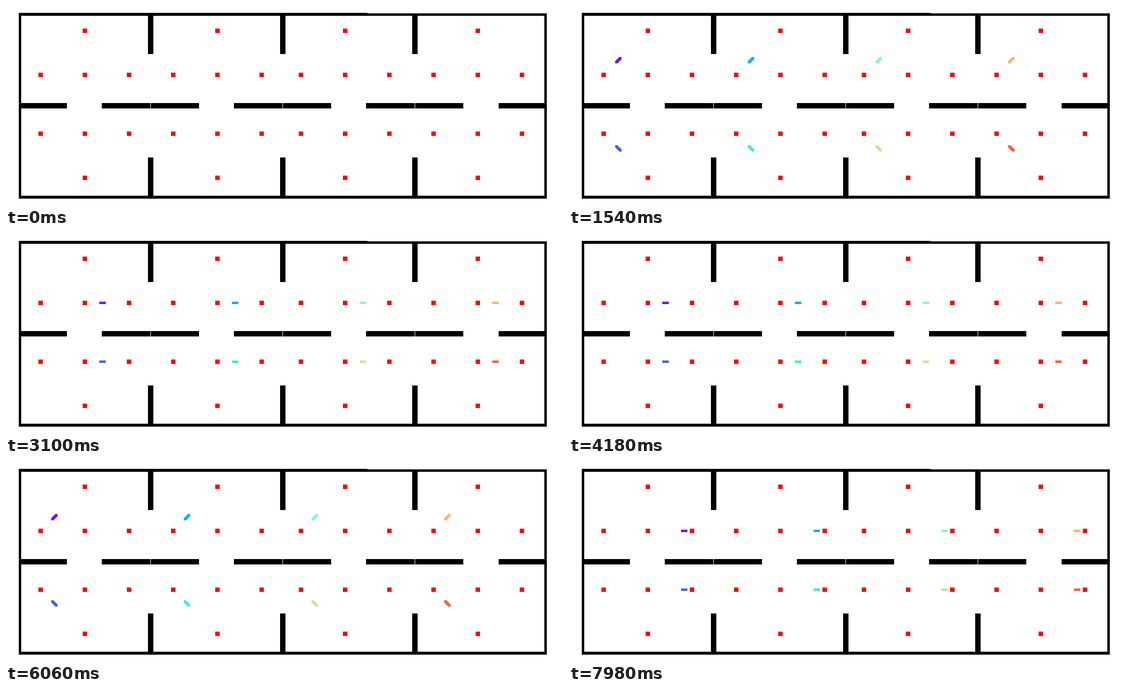
These frames come from a looping animation (1134x408 px, 8000 ms). A matplotlib script:

```python
import numpy as np
import matplotlib.pyplot as plt
from matplotlib.animation import FuncAnimation
from matplotlib.patches import Rectangle

W, H, DPI = 1134, 408, 64
FRAMES, INTERVAL = 400, 20
TRAIL = 4            # steps between tail and head
PEN = 5 * 72 / DPI   # five pixels in points

ROOM_X = (160, 430, 690, 960)
ROWS = ((140, 1), (260, -1))   # centre height and vertical sense of each row
REACH = 90

plt.rcParams["path.simplify"] = False
fig = plt.figure(figsize=(W / DPI, H / DPI), dpi=DPI, facecolor="white")
ax = fig.add_axes([0, 0, 1, 1])
ax.set_xlim(0, W)
ax.set_ylim(H, 0)
ax.axis("off")


def box(x0, y0, x1, y1, color="black"):
    ax.add_patch(Rectangle((x0, y0), x1 - x0, y1 - y0, facecolor=color,
                           linewidth=0, antialiased=False))


def waypoint(x, y):
    box(x - 4, y - 4, x + 5, y + 5, "red")


# Outer walls
box(26, 15, 1101, 20)
box(26, 14, 736, 15)
box(26, 387, 1101, 393)
box(26, 14, 31, 393)
box(1096, 15, 1101, 393)

# Walls between neighbouring rooms
for x in (289, 558, 827):
    box(x, 20, x + 11, 98)
    box(x, 309, x + 11, 387)

# Middle wall with doorways and hairline seams
for x0, x1 in ((31, 124), (195, 294), (295, 393), (464, 563),
               (564, 662), (733, 832), (833, 931), (1003, 1096)):
    box(x0, 198, x1, 209)

for x in ROOM_X:
    for y, sense in ROWS:
        for dx in (-REACH, 0, REACH):
            waypoint(x + dx, y)
        waypoint(x, y - sense * REACH)

# Tour: up, diagonally to the left, through the centre to the right, and back
LEG = 45
KNOTS = LEG * np.arange(6)
TOUR_X = REACH * np.array([0, 0, -1, 0, 1, 0])
TOUR_Y = REACH * np.array([0, -1, 0, 0, 0, 0])


def tour(steps):
    phase = steps % KNOTS[-1]
    return np.interp(phase, KNOTS, TOUR_X), np.interp(phase, KNOTS, TOUR_Y)


agents = []
for i, x in enumerate(ROOM_X):
    for j, (y, sense) in enumerate(ROWS):
        line, = ax.plot([], [], color=plt.cm.rainbow((2 * i + j) / 8),
                        linewidth=PEN, antialiased=False, snap=False,
                        solid_joinstyle="round", zorder=3)
        agents.append((line, x + 0.5, y + 0.5, sense))


def update(n):
    dx, dy = tour(np.arange(max(0, n - TRAIL), n + 1))
    slanted = np.any((np.diff(dx) != 0) & (np.diff(dy) != 0))
    for line, x, y, sense in agents:
        line.set_data(x + dx, y + sense * dy)
        line.set_solid_capstyle("round" if slanted else "projecting")
        line.set_visible(n > 0)
    return [agent[0] for agent in agents]


anim = FuncAnimation(fig, update, frames=FRAMES, interval=INTERVAL,
                     repeat=True, repeat_delay=0, blit=False)
plt.show()
```
